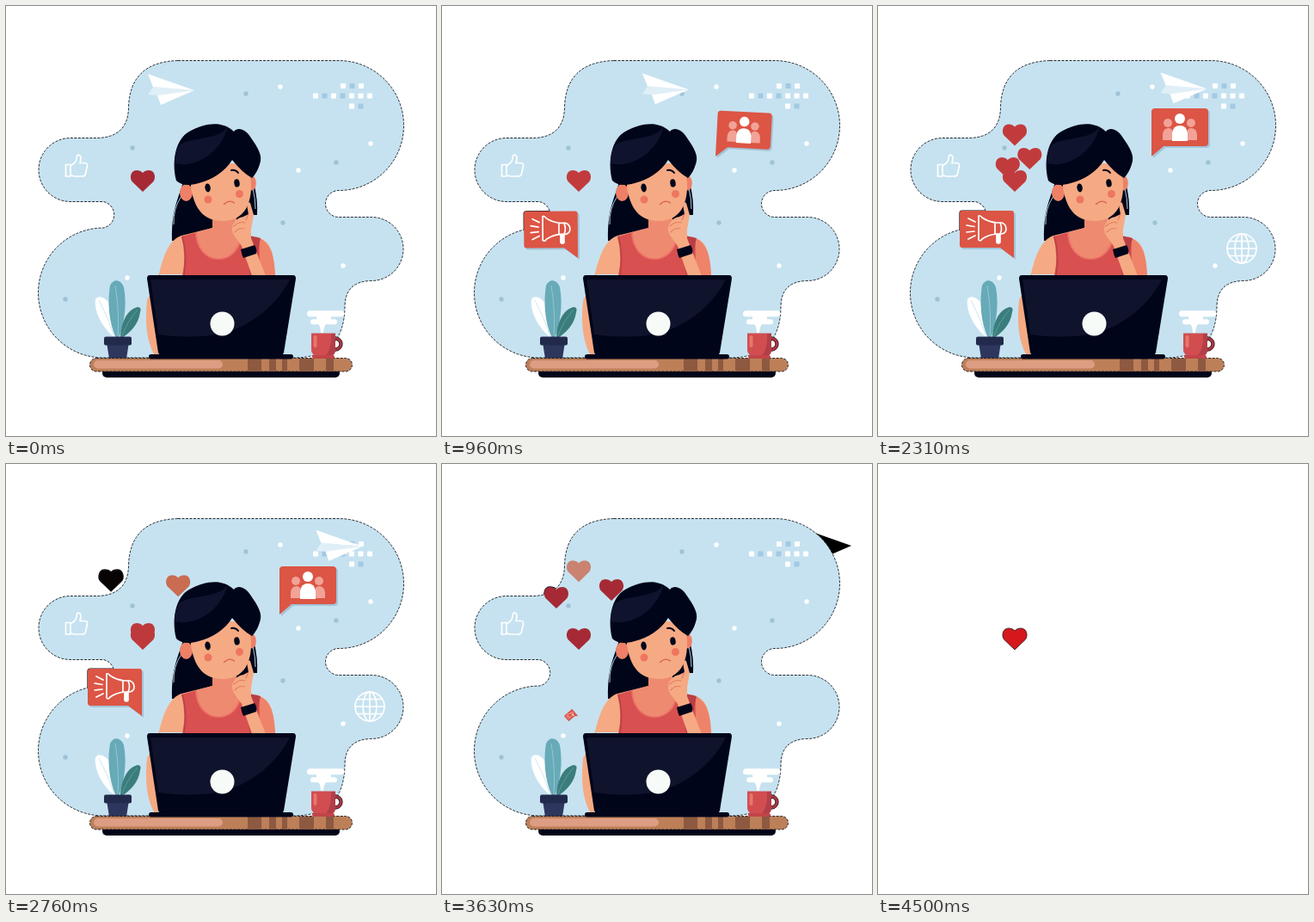
An HTML page that plays this animation: 500x500 px, repeating every 4.53 s.

```html
<!DOCTYPE html>
<html lang="en">
<head>
<meta charset="utf-8">
<title>Thinking at the laptop</title>
<style>
html, body { margin: 0; width: 100%; height: 100%; overflow: hidden; background: #fff; }
svg { display: block; width: 100vw; height: 100vh; }
.ink { stroke: #0a0d14; stroke-width: 1.2; }
.edge { stroke: #10151c; stroke-width: .9; stroke-dasharray: 3 1.5; }
.line { fill: none; stroke: #fff; stroke-width: 1.7; stroke-linecap: round; stroke-linejoin: round; }
</style>
</head>
<body>
<svg viewBox="0 0 500 500">
<defs>
  <path id="heart" d="M0 13L-12.300 1.200C-15.600-2.500-14.500-12-7.200-12C-4.200-12-1.700-11 0-9C1.700-11 4.200-12 7.200-12C14.500-12 15.600-2.500 12.300 1.200Z"/>
  <path id="megaBox" d="M-60-55H-3Q0-55 0-52V0L-16-12H-60Q-63-12-63-15V-52Q-63-55-60-55Z"/>
  <path id="peopleBox" d="M4-56H62Q66-56 66-52V-16Q66-12 62-12H14L0 0V-52Q0-56 4-56Z"/>
  <path id="planeBox" d="M-54-19L0 0L-39 17L-43 6L-54 5L-48-4Z"/>
</defs>
<g id="scene">
  <!-- dark edges that show only outside the backdrop -->
  <use id="planeDark" href="#planeBox" fill="#000"/>
  <g id="heartsDark" class="ink"></g>
  <use id="megaDark" class="ink" href="#megaBox"/>
  <path id="blob" class="edge" fill="#c6e2f0" d="M200 63.500H387A75.500 75.500 0 0 1 387 214.500A15.500 15.500 0 0 0 387 245.500H425A37 37 0 0 1 425 319.500Q394 320 394 350Q393 409 335 409H113A75.500 75.500 0 0 1 113 258A15.500 15.500 0 0 0 113 227.500H75A37 37 0 0 1 75 153.500H107Q142 152 142.500 118Q144 65 200 63.500Z"/>
  <g id="dots"></g>
  <g id="plane">
    <path fill="#e0eff7" d="M-48-4L0 0L-43 6L-54 5Z"/>
    <path fill="#fff" d="M-54-19L0 0L-48-4ZM-43 6L0 0L-39 17Z"/>
  </g>
  <path class="line" d="M69.500 184.500H75V198H69.500ZM75 186L79 183C82 181 82 178 82.500 174.500C83 172 87 173 87 177C87 180 86 181 86 182.500H92Q95 183 94.500 186L92.500 195Q92 198 88.500 198H79L75 196.500"/>
  <g id="globe" class="line">
    <circle r="17"/><ellipse rx="8" ry="17"/>
    <path d="M-17 0H17M0-17V17M-14.500-8.500H14.500M-14.500 8.500H14.500"/>
  </g>
  <g id="mega">
    <use href="#megaBox" x="2" y="2" fill="#a3c4d8"/>
    <use href="#megaBox" fill="#dc5545"/>
    <g class="line">
      <path d="M-41-49Q-39-50-37-47Q-30-42-20-41H-14Q-9-39-9-34Q-9-29-14-28H-20Q-30-27-37-22Q-39-19-41-21ZM-22-41V-28M-16-41Q-13-34-16-28M-53-46L-45-42M-55-38L-46-36.500M-55-30L-46-31M-53-22L-45-26"/>
      <path fill="#fff" d="M-20-27H-16V-18Q-18-16-20-18Z"/>
    </g>
  </g>
  <g id="people">
    <use href="#peopleBox" x="2" y="2" fill="#a3c4d8"/>
    <use href="#peopleBox" fill="#dc5545"/>
    <g fill="#f2a297">
      <circle cx="19" cy="-39" r="5"/><circle cx="46" cy="-39" r="5"/>
      <path d="M13-19V-26Q14-33 20-33Q25-33 25-26V-19ZM41-19V-26Q41-33 46-33Q52-33 53-26V-19Z"/>
    </g>
    <circle cx="33" cy="-44" r="6" fill="#fff"/>
    <path d="M24-18V-27Q25-36 33-36Q41-36 42-27V-18Z" fill="#fff"/>
  </g>
  <g id="hearts"></g>

  <!-- woman -->
  <path fill="#000519" d="M208 195C204 220 192 230 193 273L245 275L282 243H292Q293 225 288 205L284 190Z"/>
  <path fill="none" stroke="#c6e2f0" stroke-width=".9" d="M204 221Q194 236 195 254M287 212Q290 224 290 236"/>
  <path fill="#f5aa83" d="M240 258L204 267C188 272 181 297 177 316V405H172C162 386 162 363 164 342L180 312H312C312 286 307 274 295 270L268 264V250Z"/>
  <path fill="#ee8369" d="M290 268C306 273 312 286 313 313H291Z"/>
  <path fill="#d8504f" d="M204 268L222 263C222 302 270 304 273 266L295 270Q294 288 296 314H205Q210 290 204 268Z"/>
  <path fill="#ee8a70" d="M222 263L240 258V242H268V264L273 266C270 302 223 302 222 263Z"/>
  <path fill="none" stroke="#ed7467" stroke-width="2" d="M221 263C222 303 270 304 273 267"/>
  <path fill="#b93e45" d="M283 267L296 270Q291 286 293 314H284Q279 290 283 267Z"/>
  <path fill="none" stroke="#b94149" stroke-width="1.500" d="M205 268Q211 289 207 313"/>
  <ellipse cx="209.500" cy="217" rx="7.500" ry="10" fill="#ed8067"/>
  <ellipse cx="286" cy="206" rx="4.800" ry="8.500" fill="#ed8067"/>
  <path fill="#f5aa83" d="M215 183H282L285 205C286 230 277 250 252 250C229 250 219 235 215 211Z"/>
  <path fill="#000519" d="M198 203C192 179 198 154 213 146C232 136 251 133 265 146C270 140 279 144 284 152C293 165 299 174 295 184Q292 194 286 200Q275 194 263 179C255 192 240 202 224 206Q216 208 212 208Q203 208 198 203Z"/>
  <path fill="#10132e" d="M196 183C220 189 250 171 258 140C247 157 217 151 201 162Q196 171 196 183Z"/>
  <g fill="#000519">
    <ellipse cx="234.500" cy="211.500" rx="3.200" ry="5" transform="rotate(-8 234 211)"/>
    <ellipse cx="268.500" cy="206" rx="3.200" ry="4.700" transform="rotate(-8 268 206)"/>
  </g>
  <path fill="none" stroke="#000519" stroke-width="2" stroke-linecap="round" d="M262 191Q267 190 270 194"/>
  <circle cx="235" cy="225" r="4.500" fill="#ee765f"/>
  <circle cx="271.500" cy="218.500" r="4.500" fill="#ee765f"/>
  <path fill="none" stroke="#d96155" stroke-width="1.300" stroke-linecap="round" d="M253.500 230.500Q260 224.500 265.500 229"/>
  <path fill="#f5aa83" d="M274 279L266 268Q261 261 264 254Q268 246 276 245L282 242L280 231Q281 227 284 229L288 243L285 260V270L302 314H286Z"/>
  <path fill="none" stroke="#e67b62" stroke-width="1.200" stroke-linecap="round" d="M265 256Q271 250 278 252M266 263Q271 257 277 259M282 242L279 249"/>
  <path fill="#000519" d="M273 283L289 278Q292 282 291 288L276 293Q274 289 273 283Z"/>

  <!-- plant -->
  <path fill="#fff" d="M127 386C111 374 102 354 104 341C110 332 125 346 127 362Z"/>
  <path fill="none" stroke="#d3e6f0" d="M108 342Q119 362 126 385"/>
  <path fill="#67aab8" d="M128 386C119 368 118 342 121 325C125 316 134 318 137 327C141 348 137 371 131 386Z"/>
  <path fill="none" stroke="#a9d2da" stroke-width=".7" d="M127 325Q132 355 130 384"/>
  <path fill="#3b7d7d" d="M133 386C134 367 141 353 153 350Q158 350 156 356C154 370 146 378 135 386Z"/>
  <path fill="none" stroke="#5b9c9e" d="M153 353Q140 368 134 386"/>
  <path fill="#2d365c" d="M117 391H143L140 410H120Z"/>
  <rect x="114" y="384.500" width="32" height="10" rx="2" fill="#222a4c"/>

  <!-- desk -->
  <rect x="112" y="422" width="276" height="10" rx="5" fill="#000519"/>
  <rect class="edge" x="97.500" y="409.500" width="305" height="15.500" rx="7.700" fill="#bd7f58"/>
  <rect x="102" y="412" width="150" height="9.500" rx="4.700" fill="#dd9d82"/>
  <path fill="#8d5940" d="M281 410H297V425H281ZM306 410H314V425H306ZM321 410H327V425H321ZM341 410H358V425H341ZM372 410H381V425H372Z"/>

  <!-- mug -->
  <circle cx="383" cy="393" r="6.500" fill="none" stroke="#1c1015" stroke-width="4.300"/>
  <circle cx="383" cy="393" r="6.500" fill="none" stroke="#a83642" stroke-width="3"/>
  <path fill="#d14d50" d="M355 380.500H383V401Q382 407 376 407H362Q356 406 355 401Z"/>
  <path fill="#b23e48" d="M378 381H383V401Q382 407 376 407H371Q379 400 378 381Z"/>
  <rect x="357.500" y="383" width="4" height="14" rx="2" fill="#e8766b"/>
  <rect x="356" y="406" width="26" height="4" rx="2" fill="#c24449"/>
  <path fill="none" stroke="#fff" stroke-width="7" stroke-linecap="round" d="M353.500 357.800H390"/>
  <path fill="none" stroke="#fff" stroke-width="6" stroke-linecap="round" d="M357 367.200H382"/>
  <path fill="#fff" d="M361 360H378V366Q369 369 369 380H366Q366 371 361 368Z"/>

  <!-- laptop -->
  <rect x="166" y="405" width="168" height="5.500" rx="2.700" fill="#000519"/>
  <path fill="#000519" d="M167 313H334Q337 313 337 317L323 403Q322 406 319 406H181Q178 406 177 403L164 317Q164 313 167 313Z"/>
  <path fill="#10132c" d="M168 318H330C316 346 288 370 255 380Q219 388 177 382Z"/>
  <circle cx="251.500" cy="369.500" r="14" fill="#f6fbf8"/>
</g>
<use id="lastHeart" href="#heart" transform="translate(159 203)" fill="#d4181c" stroke="#2a1416" stroke-width=".8"/>
</svg>
<script>
const LOOP = 4530, STEP = 30, CUT = 4500;
const $ = id => document.getElementById(id);
const clamp = v => Math.max(0, Math.min(1, v));
const ramp = (t, start, len) => clamp((t - start) / len);
const smooth = p => p * p * (3 - 2 * p);
const mix = (a, b, p) => a + (b - a) * p;

function add(parent, tag, attrs) {
  const el = document.createElementNS('http://www.w3.org/2000/svg', tag);
  for (const k in attrs) el.setAttribute(k, attrs[k]);
  return $(parent).appendChild(el);
}
function place(el, x, y, s = 1, r = 0) {
  el.setAttribute('transform', `translate(${x} ${y}) rotate(${r}) scale(${s})`);
}
function show(el, on) { el.style.display = on ? '' : 'none'; }

// backdrop specks
const WHITE = '#fff', BLUE = '#a3c9e3', GREY = '#9fc3d6';
const speck = fill => ([cx, cy]) => add('dots', 'circle', { cx, cy, r: 2.7, fill });
[[319, 94], [424, 160], [340, 191], [392, 302], [141, 316]].forEach(speck(WHITE));
[[279, 102], [147, 165], [384, 182], [322, 252], [69, 341]].forEach(speck(GREY));
[[392, 93, 'wbw'], [360, 104.5, 'wbwbwww'], [402, 116.5, 'wb']].forEach(([x, y, row]) => {
  [...row].forEach((c, i) =>
    add('dots', 'rect', { x: x + i * 10.5 - 3, y: y - 3, width: 6, height: 6, rx: .7, fill: c === 'b' ? BLUE : WHITE }));
});

// rising hearts: start, life and offset at a given age
const up = a => [0, -88 * (1 - (1 - a / 1250) ** 1.7)];
const right = a => [a * .053, -a * .0795];
const left = a => [-a * .064, -a * .118];
const FLIGHTS = [
  { start: 1780, life: 930, pos: up },
  { start: 1983, life: 900, pos: right },
  { start: 2183, life: 580, pos: left },
  { start: 2710, life: 1000, pos: up },
  { start: 2913, life: 930, pos: right },
  { start: 3223, life: 560, pos: left }
];
const heartPair = () => [add('heartsDark', 'use', { href: '#heart' }), add('hearts', 'use', { href: '#heart' })];
FLIGHTS.forEach(f => f.els = heartPair());
const home = heartPair();

// heart tone drifts between dark (0) and light (1)
const TONES = [[0, 0], [960, 1], [1710, 0], [2310, 1], [3240, .7], [3630, 0], [4530, 0]];
function tone(t) {
  const i = TONES.findIndex(k => k[0] > t);
  const [a, b] = [TONES[i - 1], TONES[i]];
  const p = mix(a[1], b[1], (t - a[0]) / (b[0] - a[0]));
  return `rgb(${mix(166, 194, p)},${mix(42, 59, p)},${mix(53, 60, p)})`;
}

// bubble size: grows in, stays, shrinks out
const pop = (t, inAt, inLen, outAt, outLen) =>
  smooth(ramp(t, inAt, inLen)) * (1 - smooth(ramp(t, outAt, outLen)));

function bubble(ids, x, y, s, turn) {
  ids.forEach(id => {
    show($(id), s > .01);
    place($(id), x, y, s, turn * (1 - s));
  });
}

function draw(t) {
  const cut = t >= CUT;
  show($('scene'), !cut);
  show($('lastHeart'), cut);
  if (cut) return;

  const px = 219 + t * .0708, py = 98 - t * .0008;
  place($('planeDark'), px, py);
  place($('plane'), px, py);
  $('plane').setAttribute('opacity', 1 - ramp(t, 2800, 550));

  bubble(['mega', 'megaDark'], 158, 293, pop(t, 500, 485, 3285, 480), -50);
  bubble(['people'], 318, 175, pop(t, 540, 480, 3150, 400), 70);
  bubble(['globe'], 423, 282, pop(t, 1150, 400, 2750, 400), 0);

  const fill = tone(t);
  home.forEach(el => place(el, 159, 203));
  home[1].setAttribute('fill', fill);
  FLIGHTS.forEach(f => {
    const age = t - f.start, on = age >= 0 && age < f.life;
    f.els.forEach(el => show(el, on));
    if (!on) return;
    const [dx, dy] = f.pos(age);
    const fade = ramp(age, f.life - 150, 150);
    f.els.forEach(el => place(el, 159 + dx, 203 + dy));
    f.els[1].setAttribute('opacity', 1 - fade * fade);
    f.els[1].setAttribute('fill', fade > 0 ? '#c9684c' : fill);
  });
}

const t0 = performance.now();
function tick() {
  const t = (performance.now() - t0) % LOOP;
  draw(Math.floor(t / STEP) * STEP);
  requestAnimationFrame(tick);
}
draw(0);
requestAnimationFrame(tick);
</script>
</body>
</html>
```
